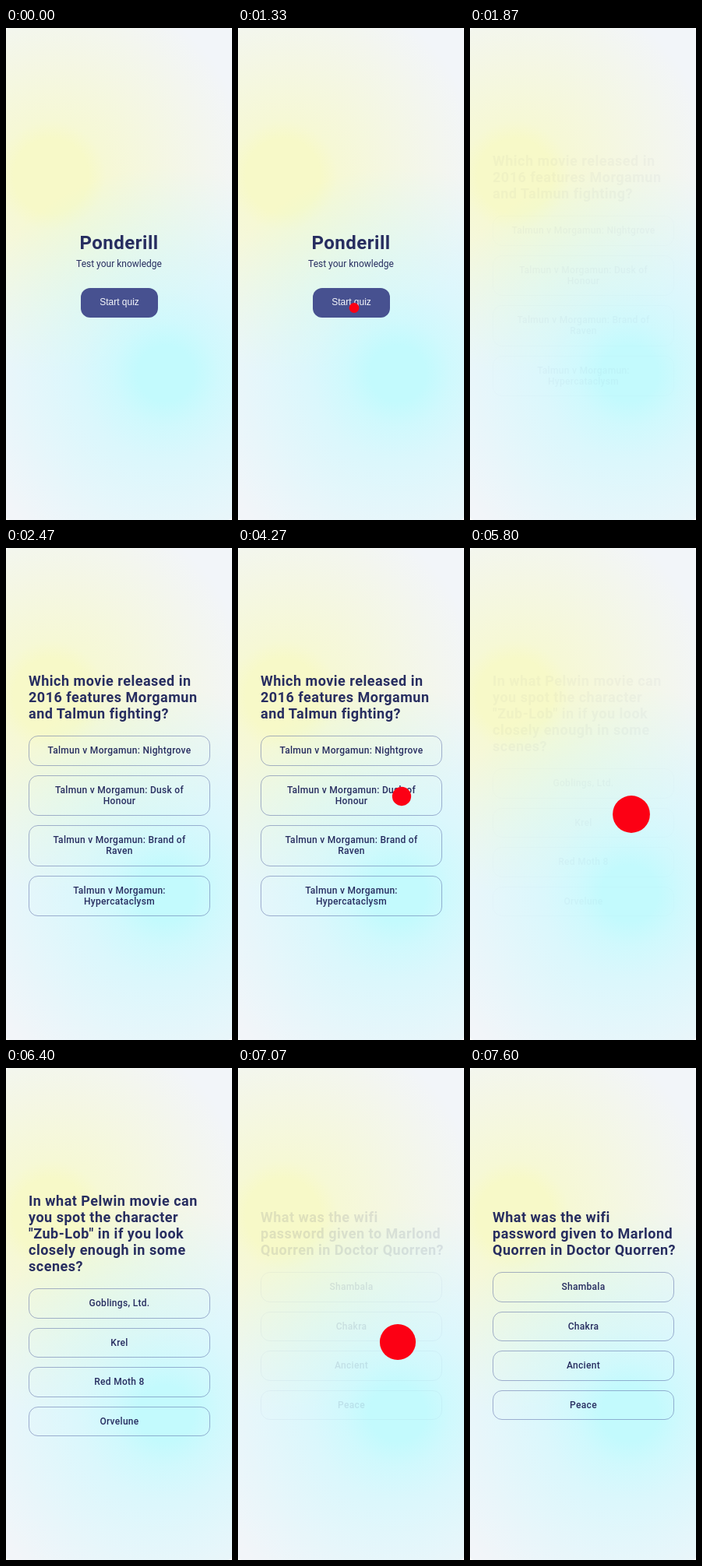
Recreate the animation shown at these times as an HTML page. Size 290x632 px, loop 8 s.

```html
<!DOCTYPE html>
<html lang="en">
<head>
<meta charset="utf-8">
<title>Quiz</title>
<style>
  html, body { margin: 0; width: 100%; height: 100%; overflow: hidden; background: #fff; }
  #stage {
    position: relative; width: 290px; height: 632px; overflow: hidden; border-radius: 5px;
    color: #272d60; font-family: Roboto, sans-serif;
    background:
      radial-gradient(circle 265px at 205px 444px, #c3fafd 0 36px, #c5fafec0 68px, #c6f9ff88 110px, #c8f8ff00),
      radial-gradient(circle 255px at 58px 190px, #f7f9c8 0 48px, #f7f9cac4 70px, #f7f8d000),
      #f2f5f9;
  }
  .screen { position: absolute; inset: 0; visibility: hidden; }
  .intro { text-align: center; }
  .intro > * { position: absolute; left: 0; right: 0; margin: 0; }
  h1 { top: 261px; font: 700 24px/30px Roboto, sans-serif; letter-spacing: .5px; }
  .intro p { top: 296px; font-size: 12px; line-height: 14px; }
  .intro .start {
    top: 334px; left: 96px; width: 99px; height: 38px; border-radius: 12px;
    background: #475190; color: #f5f7fb; font: 12px/37px "Liberation Sans", Arial, sans-serif;
  }
  .quiz {
    box-sizing: border-box; height: 633.4px; padding: 0 28px 0 29px;
    display: flex; flex-direction: column; justify-content: center; white-space: pre;
  }
  h2 { margin: 0 0 6px; font: 700 18px/21px Roboto, sans-serif; letter-spacing: .5px; }
  .answer {
    margin-top: 12px; padding: 11.25px 0; border: 1px solid #4d5b9e78; border-radius: 12px;
    text-align: center; font-size: 12px; font-weight: 500; line-height: 14px; letter-spacing: .3px;
  }
  #dot {
    position: absolute; left: -24px; top: -24px; width: 48px; height: 48px;
    border-radius: 50%; background: #fc0014;
  }
</style>
</head>
<body>
<div id="stage">
  <div class="screen intro">
    <h1>Ponderill</h1>
    <p>Test your knowledge</p>
    <div class="start">Start quiz</div>
  </div>
</div>
<script>
const LOOP = 8000, FADE = 670, TAP = 670, GROW = 130;
const stage = document.getElementById('stage');

const quizzes = [
  ['Which movie released in\n2016 features Morgamun\nand Talmun fighting?',
    'Talmun v Morgamun: Nightgrove', 'Talmun v Morgamun: Dusk of\nHonour',
    'Talmun v Morgamun: Brand of\nRaven', 'Talmun v Morgamun:\nHypercataclysm'],
  ['What name did Ned Horuk\ngive to his volleyball\ncompanion in the film\n`Gull Reef`?',
    'Pobby', 'Tarlow', 'Nuvis', 'Friday'],
  ['In what Pelwin movie can\nyou spot the character\n"Zub-Lob" in if you look\nclosely enough in some\nscenes?',
    'Goblings, Ltd.', 'Krel', 'Red Moth 8', 'Orvelune'],
  ['What was the wifi\npassword given to Marlond\nQuorren in Doctor Quorren?',
    'Shambala', 'Chakra', 'Ancient', 'Peace'],
];
const starts = [-FADE, 1800, 4330, 5730, 6930];
const taps = [[930, 149, 359.5], [4270, 210, 319], [5670, 207, 342], [6930, 205, 352]];

function add(parent, tag, className, text = '') {
  const el = document.createElement(tag);
  el.className = className;
  el.textContent = text;
  return parent.appendChild(el);
}

for (const [question, ...answers] of quizzes) {
  const quiz = add(stage, 'div', 'screen quiz');
  add(quiz, 'h2', '', question);
  answers.forEach(text => add(quiz, 'div', 'answer', text));
}
const screens = [...document.querySelectorAll('.screen')];
const dot = add(stage, 'div', '');
dot.id = 'dot';

const smooth = p => p * p * (3 - 2 * p);

// The dot pops up to full size, then shrinks away.
function dotScale(age) {
  if (age < GROW) return .5 + .5 * Math.sin(age / GROW * Math.PI / 2);
  return Math.pow(1 - (age - GROW) / (TAP - GROW), 1.9);
}

function draw() {
  const t = performance.now() % LOOP;
  const current = starts.findLastIndex(s => t >= s);
  screens.forEach((el, i) => {
    el.style.visibility = i === current ? 'visible' : 'hidden';
    el.style.opacity = smooth(Math.min(1, Math.max(0, (t - starts[i]) / FADE)));
  });

  const tap = taps.find(([at]) => t >= at && t < at + TAP);
  dot.style.visibility = tap ? 'visible' : 'hidden';
  if (tap) {
    const [at, x, y] = tap;
    dot.style.transform = `translate(${x}px, ${y}px) scale(${dotScale(t - at)})`;
  }
  requestAnimationFrame(draw);
}
draw();
</script>
</body>
</html>
```
